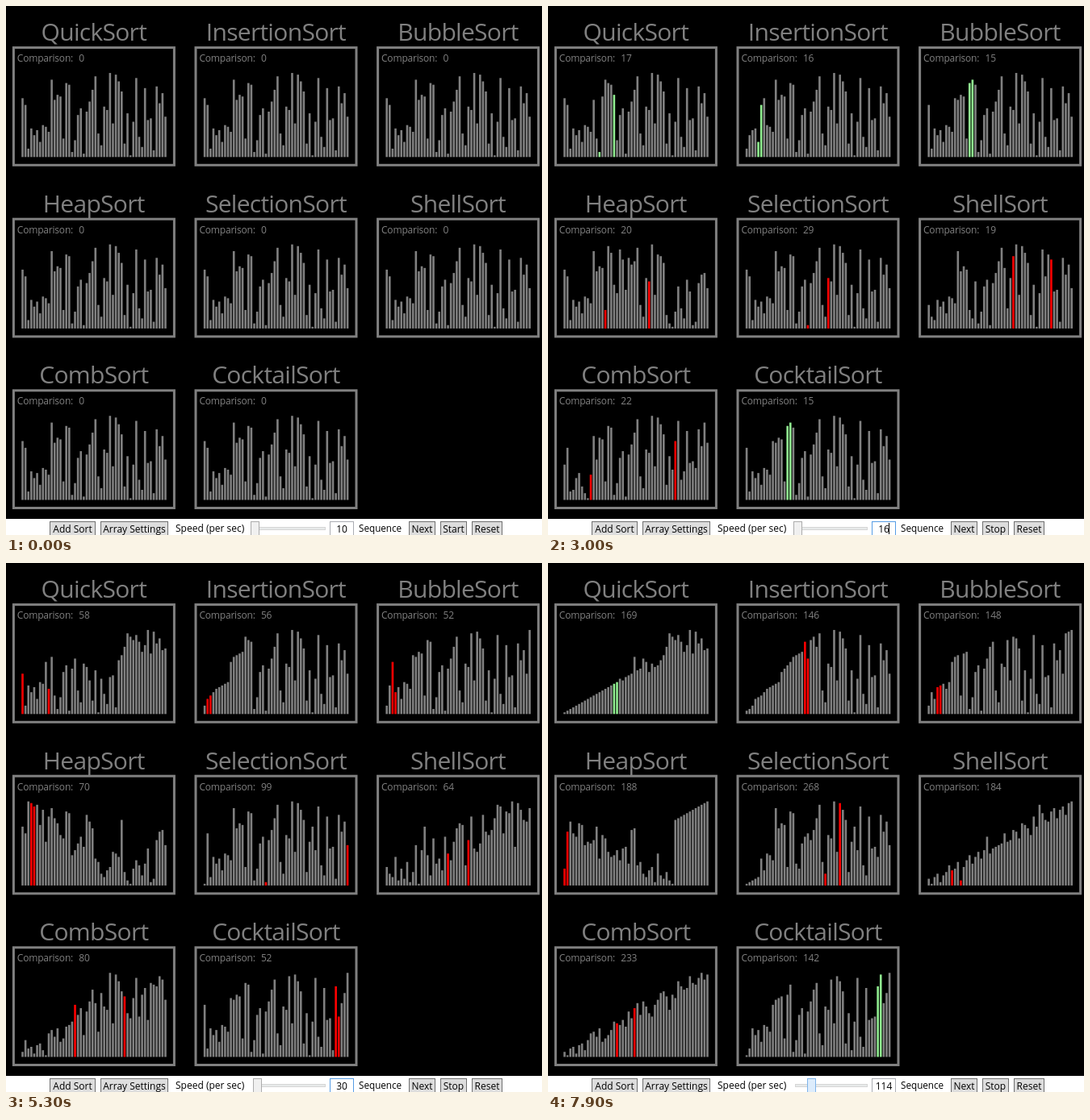
An HTML page with a canvas for the animation above (8 s loop, 664 by 656 pixels).

```html
<!DOCTYPE html>
<html lang="en">
<head>
<meta charset="utf-8">
<title>Sorting comparison</title>
<style>
  html, body { margin: 0; width: 100%; height: 100%; overflow: hidden; background: #000; }
  canvas { display: block; }
</style>
</head>
<body>
<canvas id="stage" width="664" height="656"></canvas>
<script>
const ctx = document.getElementById('stage').getContext('2d');
const FONT = '"Open Sans", "Noto Sans", sans-serif';
const GRAY = '#808080';
const LOOP = 8000;

const START = [
  35, 31, 5, 17, 13, 16, 9, 19, 18, 15, 46, 34, 37, 36, 11, 44, 43, 3, 10, 25,
  29, 2, 27, 33, 40, 48, 14, 7, 30, 28, 50, 20, 49, 45, 39, 8, 26, 1, 21, 47,
  12, 6, 41, 22, 23, 4, 42, 32, 38, 24];
const SIZE = START.length;

// Each sort works through cmp(i, j), true if i holds the larger value,
// swap(i, j), and move(i, j), a swap that is not shown as a step.
const SORTS = {
  QuickSort(cmp, swap) {
    const sort = (lo, hi) => {
      if (lo >= hi) return;
      let mid = lo;
      for (let i = lo + 1; i <= hi; i++) if (cmp(lo, i)) swap(++mid, i);
      swap(lo, mid);
      sort(lo, mid - 1);
      sort(mid + 1, hi);
    };
    sort(0, SIZE - 1);
  },
  InsertionSort(cmp, swap) {
    for (let i = 1; i < SIZE; i++)
      for (let j = i; j > 0 && cmp(j - 1, j); j--) swap(j - 1, j);
  },
  BubbleSort(cmp, swap) {
    for (let end = SIZE - 1; end > 0; end--)
      for (let i = 0; i < end; i++) if (cmp(i, i + 1)) swap(i, i + 1);
  },
  HeapSort(cmp, swap, move) {
    const sift = (root, end) => {
      for (;;) {
        const left = 2 * root + 1;
        let top = root;
        for (let c = left; c <= left + 1 && c < end; c++) if (cmp(c, top)) top = c;
        if (top === root) return;
        swap(root, top);
        root = top;
      }
    };
    for (let i = SIZE / 2 - 1; i >= 0; i--) sift(i, SIZE);
    for (let end = SIZE - 1; end > 0; end--) {
      move(0, end);
      sift(0, end);
    }
  },
  SelectionSort(cmp, swap) {
    for (let i = 0; i < SIZE; i++) {
      let min = i;
      for (let j = i; j < SIZE; j++) if (cmp(min, j)) min = j;
      swap(i, min);
    }
  },
  ShellSort(cmp, swap) {
    for (const gap of [13, 7, 3, 1])
      for (let g = 0; g < gap; g++)
        for (let i = g + gap; i < SIZE; i += gap)
          for (let j = i; j >= gap && cmp(j - gap, j); j -= gap) swap(j - gap, j);
  },
  CombSort(cmp, swap) {
    for (let size = SIZE / 1.3; size >= 1; size /= 1.3) {
      const gap = Math.floor(size);
      for (let i = 0; i + gap < SIZE; i++) if (cmp(i, i + gap)) swap(i, i + gap);
    }
  },
  CocktailSort(cmp, swap) {
    const step = i => { if (cmp(i, i + 1)) swap(i, i + 1); };
    for (let lo = 0, hi = SIZE - 1; lo < hi; lo++, hi--) {
      for (let i = lo; i < hi; i++) step(i);
      for (let i = hi - 2; i >= lo; i--) step(i);
    }
  }
};

function record(sort) {
  const a = START.slice();
  const states = [{ bars: START, marks: [], count: 0 }];
  let count = 0;
  const save = (marks, color) => states.push({ bars: a.slice(), marks, color, count });
  const move = (i, j) => { [a[i], a[j]] = [a[j], a[i]]; };
  sort(
    (i, j) => { count++; save([i, j], '#f00'); return a[i] > a[j]; },
    (i, j) => { move(i, j); save([i, j], '#90ee90'); },
    move);
  return states;
}

const panels = Object.entries(SORTS).map(([name, sort], k) => ({
  name, states: record(sort), x: k % 3 * 225.6 - 0.2, y: Math.floor(k / 3) * 212.6
}));

// [time, value] points
const STEPS = [[500, 0], [2000, 15], [2800, 29], [3000, 29], [3500, 41], [4400, 71],
  [5300, 100], [6000, 124], [6500, 145], [7000, 180], [7900, 273]];
const SPEED = [[2000, 10], [2200, 16], [3000, 16], [3100, 30], [6000, 30],
  [6500, 52], [7000, 90], [7900, 114]];
// ticks (100 ms) on which the display does not refresh
const HOLDS = [6, 9, 11, 12, 14, 21, 29, 34, 36, 55];

function valueAt(points, t) {
  let [t0, v0] = points[0];
  for (const [t1, v1] of points) {
    if (t < t1) return t <= t0 ? v0 : Math.round(v0 + (v1 - v0) * (t - t0) / (t1 - t0));
    [t0, v0] = [t1, v1];
  }
  return v0;
}

function text(str, x, y, size, color, align = 'left', spacing = 0) {
  ctx.font = `${size}px ${FONT}`;
  ctx.letterSpacing = spacing + 'px';
  ctx.textAlign = align;
  ctx.fillStyle = color;
  ctx.fillText(str, x, y);
}

function box(x, y, w, h, fill, line) {
  ctx.fillStyle = fill;
  ctx.fillRect(x, y, w, h);
  ctx.lineWidth = 1;
  ctx.strokeStyle = line;
  ctx.strokeRect(x + 0.5, y + 0.5, w - 1, h - 1);
}

function button(label, x, right) {
  box(x, 639, right - x, 18, '#ddd', '#707070');
  text(label, (x + right) / 2, 653, 12, '#000', 'center');
}

function drawPanel({ name, states, x, y }, step) {
  const { bars, marks, color, count } = states[Math.min(step, states.length - 1)];
  ctx.save();
  ctx.translate(x, y);
  text(name, 109, 43, 30, GRAY, 'center', -0.7);
  ctx.strokeStyle = GRAY;
  ctx.lineWidth = 3;
  ctx.strokeRect(9.6, 51.6, 199, 145.7);
  text('Comparison:', 14, 69, 12, GRAY, 'left', -0.2);
  text(count, 90.5, 69, 12, GRAY, 'left', -0.2);
  bars.forEach((v, i) => {
    ctx.fillStyle = marks.includes(i) ? color : GRAY;
    ctx.fillRect(19.4 + i * 3.612, 187.3 - v * 2.085, 2.6, v * 2.085);
  });
  ctx.restore();
}

function drawControls(t) {
  const speed = valueAt(SPEED, t);
  const typing = t >= 3000 && t < 6000;
  const sliding = (t >= 1500 && t < 2800) || t >= 6000;
  ctx.fillStyle = '#fff';
  ctx.fillRect(0, 636, 664, 20);
  button('Add Sort', 54, 111);
  button('Array Settings', 117, 201);
  text('Speed (per sec)', 210, 652, 12, '#000');
  box(306, 646, 90, 4, '#e7eaea', '#d6d6d6');
  box(Math.round(303 + (speed - 10) * 0.173), 639, 11, 18,
    sliding ? '#dcecfc' : '#f0f0f0', sliding ? '#7eb4ea' : '#acacac');
  box(401, 639, 30, 18, '#fff', typing ? '#569de5' : '#abadb3');
  text(speed, 416, 653, 12, '#000', 'center');
  if (t >= 3000 && t < 3300) {
    ctx.fillStyle = '#000';
    ctx.fillRect(422, 641, 1, 14);
  }
  text('Sequence', 437, 652, 11.7, '#000');
  button('Next', 499, 532);
  button(t < 500 ? 'Start' : 'Stop', 538, 571);
  button('Reset', 577, 615);
}

function draw(now) {
  let tick = Math.floor(now % LOOP / 100);
  while (HOLDS.includes(tick)) tick--;
  const t = tick * 100;
  ctx.fillStyle = '#000';
  ctx.fillRect(0, 0, 664, 656);
  const step = valueAt(STEPS, t);
  panels.forEach(p => drawPanel(p, step));
  drawControls(t);
}

let begin;
function loop(now) {
  begin ??= now;
  draw(now - begin);
  requestAnimationFrame(loop);
}
requestAnimationFrame(loop);
</script>
</body>
</html>
```
